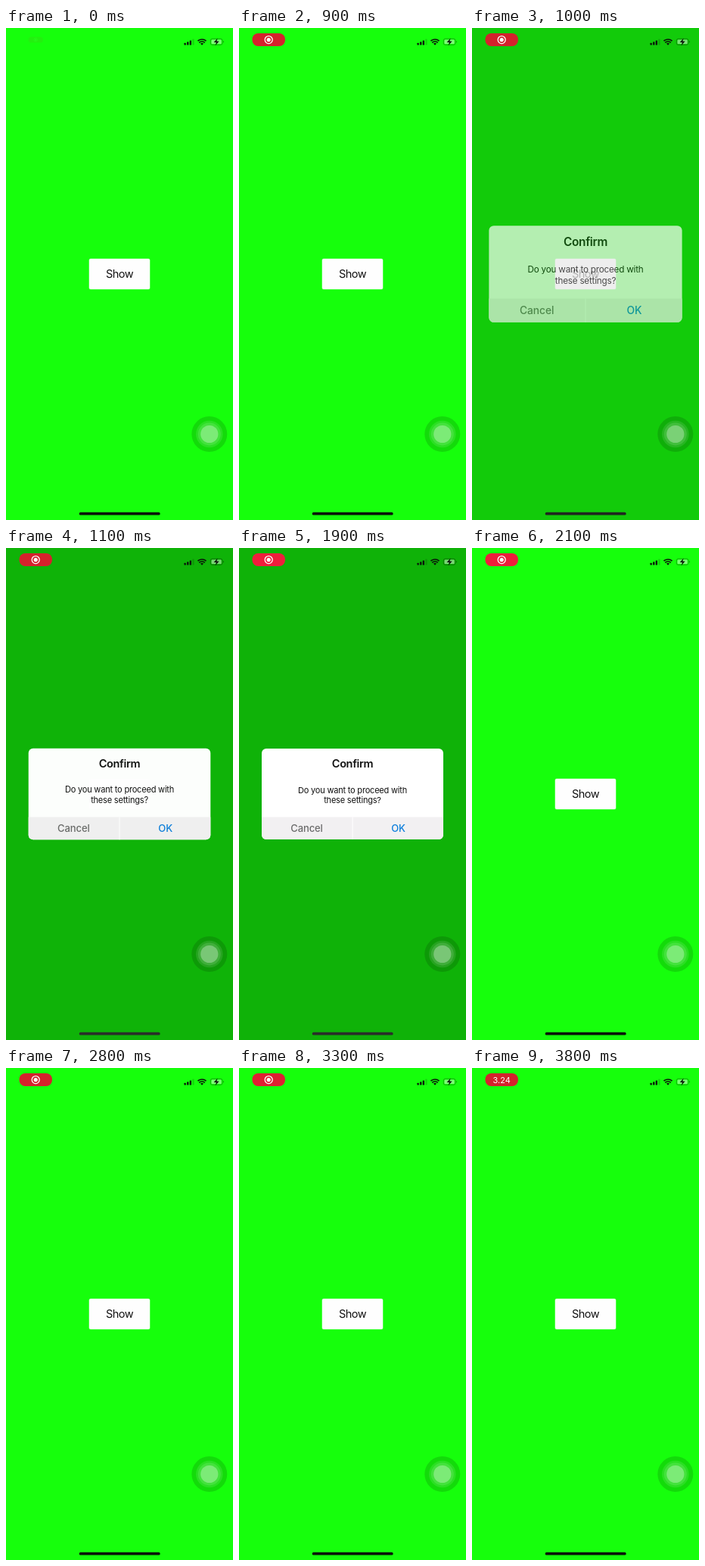
Recreate the animation shown at these times as an HTML page. Size 300 px wide and 650 px high, loop 3.9 s.

```html
<!DOCTYPE html>
<html lang="en">
<head>
<meta charset="utf-8">
<title>Confirm dialog</title>
<style>
  html, body { margin: 0; width: 100%; height: 100%; overflow: hidden; background: #16ff0c; }
  svg { display: block; width: 300px; height: 650px; }
  text { font-family: Inter, sans-serif; text-anchor: middle; fill: #111; }
  .show { font-size: 14.5px; letter-spacing: -.5px; }
  .title { font-size: 14.5px; font-weight: 600; letter-spacing: -.35px; }
  .message { font-size: 11px; letter-spacing: -.2px; }
  .action { font-size: 13px; font-weight: 500; letter-spacing: -.1px; }
  .clock { font-size: 11px; fill: #fff; }
</style>
</head>
<body>
<svg viewBox="0 0 300 650">
  <rect width="300" height="650" fill="#16ff0c"/>

  <rect x="109.5" y="304.5" width="81" height="41" rx="2.5" fill="#fff" opacity=".5"/>
  <rect x="110" y="305" width="80" height="40" rx="2" fill="#fefefe"/>
  <text class="show" x="150" y="330">Show</text>

  <rect id="backdrop" width="300" height="650"/>
  <g id="dialog">
    <rect x="30" y="265" width="240" height="120" rx="6" fill="#fff"/>
    <path d="M30 355.5H270V379a6 6 0 0 1-6 6H36a6 6 0 0 1-6-6z" fill="#f2f0f2"/>
    <path d="M150 355.5V385" stroke="#fff"/>
    <text class="title" x="150" y="290">Confirm</text>
    <text class="message" x="150" y="323.5">Do you want to proceed with</text>
    <text class="message" x="150" y="337">these settings?</text>
    <text class="action" x="89.5" y="375" style="fill:#6b6b6b">Cancel</text>
    <text class="action" x="210.5" y="375" style="fill:#0f7fdc">OK</text>
  </g>

  <g id="pill">
    <rect id="pillShape" x="17.5" y="7" width="43.5" height="17" rx="8"/>
    <g id="record">
      <circle cx="39.2" cy="15.6" r="5" fill="none" stroke="#fff" stroke-width="1.3"/>
      <circle cx="39.2" cy="15.6" r="2.6" fill="#fff"/>
    </g>
    <text id="clock" class="clock" x="39.2" y="19.6">3.24</text>
  </g>

  <g fill="#0a140a">
    <rect x="235.5" y="19.7" width="2.3" height="2.8" rx=".6"/>
    <rect x="239.1" y="18.3" width="2.3" height="4.2" rx=".6"/>
    <rect x="242.7" y="16.4" width="2.3" height="6.1" rx=".6"/>
    <rect x="246.3" y="14.5" width="2.3" height="8" rx=".6" opacity=".18"/>
    <path d="M257 20.6a3 3 0 0 1 4 0l-2 2.1z"/>
  </g>
  <g fill="none" stroke="#0a140a" stroke-width="1.6">
    <path d="M253.5 17.2a8 8 0 0 1 11 0M255.3 19.3a5.4 5.4 0 0 1 7.4 0"/>
  </g>
  <rect x="270.3" y="14.3" width="15.6" height="8" rx="2.3" fill="none" stroke="#000" stroke-opacity=".4" stroke-width=".8"/>
  <rect x="271.5" y="15.5" width="13.2" height="5.6" rx="1.2" fill="#fff" opacity=".45"/>
  <path d="M287 17v2.6q1-.3 1-1.3t-1-1.3z" opacity=".4"/>
  <path d="M279.6 13.4l-5 5.6h3.2l-1.2 4.2 5-5.7h-3.2z" fill="#0a140a"/>

  <circle cx="268.8" cy="536.5" r="23.5" opacity=".14"/>
  <g fill="#fff">
    <circle cx="268.8" cy="536.5" r="17.8" opacity=".1"/>
    <circle cx="268.8" cy="536.5" r="15" opacity=".12"/>
    <circle cx="268.8" cy="536.5" r="11.6" opacity=".3"/>
  </g>
  <rect id="homeBar" x="96.7" y="639.8" width="107" height="3.8" rx="1.9"/>
</svg>
<script>
  const LOOP = 3900, STEP = 100;
  const $ = id => document.getElementById(id);
  const set = (id, attrs) => {
    for (const name in attrs) $(id).setAttribute(name, attrs[name]);
  };
  const progress = (t, start, duration) => Math.min(1, Math.max(0, (t - start) / duration));
  const easeOut = p => 1 - (1 - p) ** 3;
  const mix = (from, to, p) => from + (to - from) * p;
  const blend = (a, b, p) => `rgb(${a.map((v, i) => Math.round(mix(v, b[i], p)))})`;
  const scaleAt = (x, y, s) => `translate(${x} ${y}) scale(${s}) translate(${-x} ${-y})`;

  function drawDialog(t) {
    const opened = easeOut(progress(t, 930, 220));
    const closed = progress(t, 1900, 200);
    const shade = opened * (1 - closed) ** 3;
    const scale = 1.2 - .2 * opened + .1 * closed;
    set('backdrop', { opacity: .3 * shade });
    set('dialog', { opacity: opened * (1 - closed), transform: scaleAt(150, 325, scale) });
    set('homeBar', { fill: blend([10, 20, 10], [42, 46, 42], shade) });
  }

  function drawPill(t) {
    const shown = easeOut(progress(t, 0, 400));
    const clock = progress(t, 3600, 200);
    const pulse = (1 + Math.cos((t - 1950) / 1900 * 2 * Math.PI)) / 2 * (1 - clock);
    set('pill', { opacity: mix(.06, 1, shown), transform: scaleAt(39.2, 15.5, mix(.45, 1, shown)) });
    set('pillShape', { fill: blend([212, 34, 44], [240, 30, 60], pulse) });
    set('record', { opacity: 1 - clock });
    set('clock', { opacity: clock });
  }

  function render() {
    const t = Math.floor(performance.now() % LOOP / STEP) * STEP;
    drawDialog(t);
    drawPill(t);
    requestAnimationFrame(render);
  }
  render();
</script>
</body>
</html>
```
